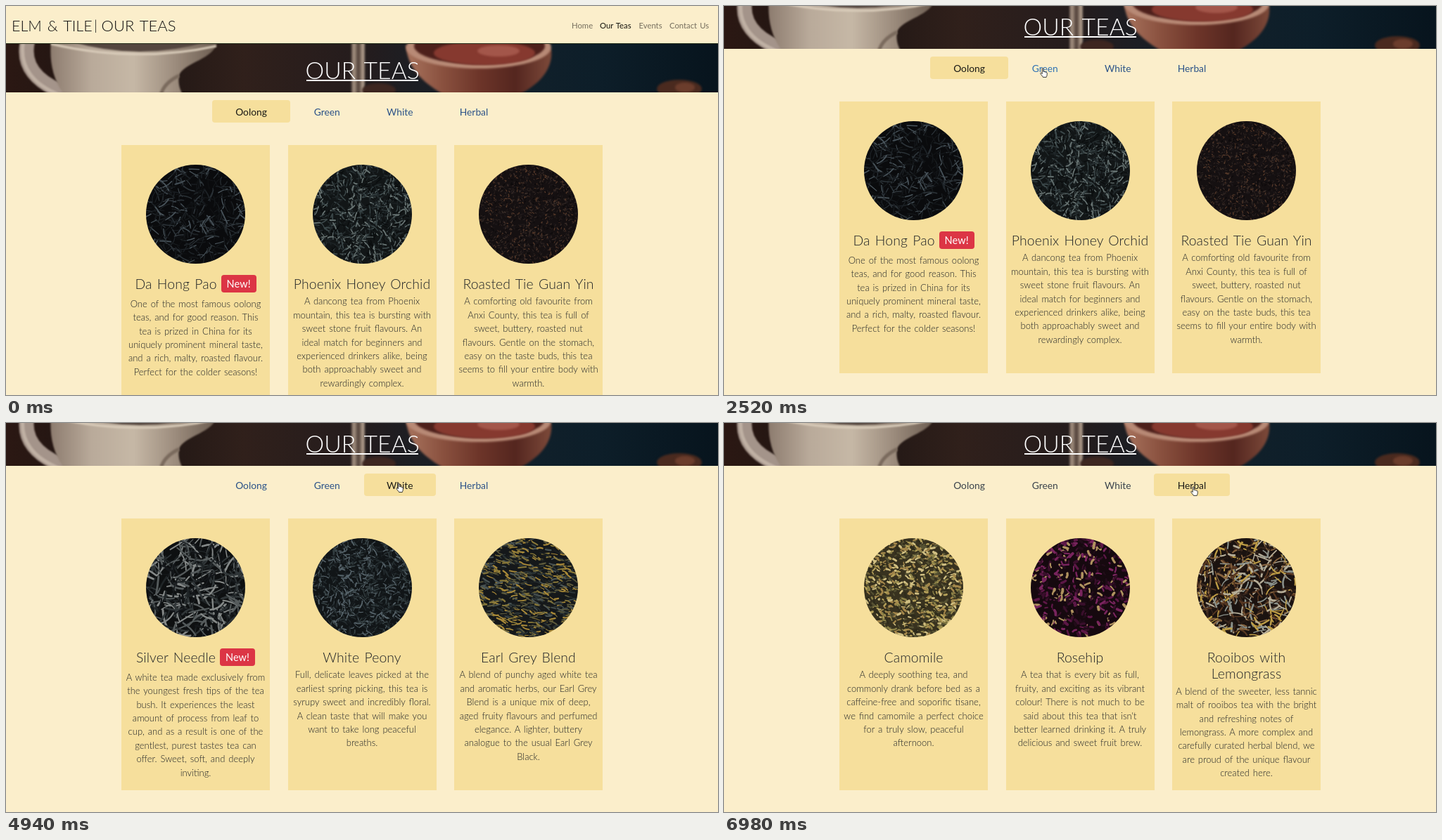
Animation, 1012 px wide and 554 px high, one loop 7.67 s. Source, as an HTML page with a canvas:

```html
<!DOCTYPE html>
<html lang="en">
<head>
<meta charset="utf-8">
<title>Our Teas</title>
<style>
html, body { margin: 0; width: 100%; height: 100%; overflow: hidden; background: #fbeecb; }
body { position: relative; font-family: Lato, "Open Sans", sans-serif; font-weight: 300; color: #212427; }
#page { position: absolute; left: 0; top: 0; width: 1012px; height: 640px; }
#page > *, .pane > *, .txt { position: absolute; white-space: nowrap; }
.txt { line-height: 30px; word-spacing: .1em; }
#rule { left: 0; top: 53px; width: 1012px; height: 1px; background: #26301c; }
#hero { left: 0; top: 54px; }
#line { left: 427px; top: 104.5px; width: 159px; height: 2.5px; background: #fff; }
.tab { top: 134px; height: 32px; line-height: 33px; text-align: center; font-size: 13.8px; border-radius: 4px; font-weight: 400; }
.pane { left: 0; top: 198px; width: 1012px; height: 387px; }
.card { top: 0; width: 211px; height: 386.5px; background: #f6df9c; text-align: center; }
.card canvas { position: absolute; left: 35px; top: 28px; width: 141px; height: 141px; border-radius: 50%; }
h3 { margin: 185.5px 0 4.3px; font: inherit; font-size: 19.4px; line-height: 23.5px; letter-spacing: .1px; word-spacing: .1em; }
h3.new { display: flex; justify-content: center; gap: 6px; height: 23.5px; padding-bottom: 3.4px; }
.badge { width: 50px; height: 25px; margin-top: -.5px; border-radius: 4px; background: #dc3545; color: #fff; font-size: 14.5px; line-height: 26px; font-weight: 400; }
p { margin: 0; font-size: 13px; line-height: 19.4px; word-spacing: 1.4px; font-weight: 300; }
#bar { position: absolute; left: 1006px; top: 0; width: 5px; height: 394px; border-radius: 3px; background: #000; }
#hand { position: absolute; left: 0; top: 0; overflow: visible; }
</style>
</head>
<body>
<div id="page">
  <div id="rule"></div>
  <canvas id="hero" width="1012" height="69"></canvas>
  <div id="line"></div>
</div>
<div id="bar"></div>
<svg id="hand" width="12" height="15"><path fill="#fff" stroke="#222" stroke-width=".9" stroke-linejoin="round"
  d="M3.2 1.6C3.2.3 5 .3 5 1.6V5.6C5.3 4.9 6.7 5 6.8 6 7.2 5.4 8.4 5.6 8.5 6.6 9 6.1 10.2 6.4 10.2 7.6V9.6C10.2 11.6 9.3 12.2 9.2 13.4H4.4C4.2 12 1.2 9.9.8 8.3.6 7.2 1.9 7 2.5 7.8L3.2 8.6Z"/></svg>
<script>
const LOOP = 7670;
const $ = id => document.getElementById(id);
const page = $('page');

function add(parent, tag, cls, text, style) {
  const el = document.createElement(tag);
  el.className = cls;
  el.textContent = text;
  Object.assign(el.style, style);
  return parent.appendChild(el);
}

const label = (text, x, mid, size, color, weight = 300) => add(page, 'div', 'txt', text,
  { left: x + 'px', top: mid - 15 + 'px', fontSize: size + 'px', color, fontWeight: weight });

label('ELM & TILE', 8, 27.5, 21.5, '#111');
label('|', 125, 27, 20, '#111');
label('OUR TEAS', 135.5, 27.5, 22, '#111');
label('Home', 804, 27.5, 11.3, '#77705f', 400);
label('Our Teas', 844, 27.5, 11.3, '#17160f', 400);
label('Events', 899.5, 27.5, 11.3, '#77705f', 400);
label('Contact Us', 943, 27.5, 11.3, '#77705f', 400);
label('OUR TEAS', 425.5, 91, 33.7, '#fff');

// Soft shapes for the banner picture
function paintHero() {
  const c = $('hero').getContext('2d');
  const ramp = (x0, x1, ...cols) => {
    const g = c.createLinearGradient(x0, 0, x1, 0);
    cols.forEach((col, i) => g.addColorStop(i / (cols.length - 1), col));
    return g;
  };
  const shape = (d, fill) => { c.fillStyle = fill; c.fill(new Path2D(d)); };
  const curve = (d, color, w) => { c.strokeStyle = color; c.lineWidth = w; c.stroke(new Path2D(d)); };
  const oval = (x, y, rx, ry, fill) => {
    c.fillStyle = fill;
    c.beginPath();
    c.ellipse(x, y, rx, ry, 0, 0, 7);
    c.fill();
  };
  c.fillStyle = ramp(0, 1012, '#2b1813', '#1c1412', '#30201b', '#241c1d', '#13212b', '#0d1e29', '#07141d');
  c.fillRect(0, 0, 1012, 69);
  c.filter = 'blur(1.2px)';
  curve('M31 -5C22 30 42 56 90 72', '#a4948a', 21);
  curve('M25 -5C18 30 36 58 80 74', '#c0b1a4', 5);
  shape('M64 -4H300C298 22 252 26 246 45 244 58 248 66 252 74H84C64 48 62 20 64 -4Z',
    ramp(62, 300, '#8c7b6e', '#b9aa9a', '#c6b8a6', '#9c8c7d', '#6b5c50'));
  shape('M90 -4H290Q190 26 90 -4Z', '#54463f');
  curve('M64 0Q185 28 299 3', '#d8cbb9', 3);
  curve('M246 45C232 52 222 62 220 74', '#7a6a5d', 5);
  c.filter = 'blur(1.5px)';
  c.fillStyle = ramp(488, 514, '#3a2c28', '#a99685', '#4b3b34', '#b8a493', '#2b2423');
  c.fillRect(491, -4, 19, 78);
  oval(530, 66, 24, 10, '#3d2620');
  shape('M568 2C572 40 598 58 625 74H725C760 58 778 34 775 8Z',
    ramp(568, 776, '#a8745e', '#8a513f', '#6d3529', '#54261f', '#7d4a3a'));
  oval(672, 5, 103, 30, '#b88a76');
  oval(673, 3, 93, 26, '#4d201b');
  oval(680, 13, 72, 17, '#86392f');
  oval(700, 10, 30, 8, '#a3564a');
  oval(957, 64, 32, 13, '#4a2a1f');
  oval(965, 62, 14, 7, '#6b3d2c');
}
paintHero();

function seeded(s) {
  return () => {
    s = (s * 1664525 + 1013904223) % 4294967296;
    return s / 4294967296;
  };
}

// Leaves: base, colours, count, length, width, spread of direction (1 = any)
const looks = {
  daHong: ['#0a0b0d', '#14171a #1c2125 #2b3237 #48535a #0f1113', 520, 15, 1.6, 1],
  phoenix: ['#121617', '#242c2e #3b4749 #687473 #0b0e0f #1b2123', 1000, 9, 1.7, 1],
  tieGuan: ['#151011', '#2a211f #3b2e29 #1f191b #573a2a #0d0a0b', 1700, 2.5, 1.3, 1],
  genmai: ['#12130f', '#20241c #2b3028 #a06b33 #b68144 #7c4c20 #15170f', 560, 4.5, 4.2, 1],
  biluo: ['#12160e', '#84936a #a9b48f #57663f #36422a #1b2214', 330, 20, 3.1, .55],
  silver: ['#0e1011', '#858988 #555b5c #303638 #1f2426 #14171a', 400, 23, 2.5, 1],
  peony: ['#111517', '#354043 #56636a #232b2e #171c1f', 1150, 8, 1.6, 1],
  earl: ['#15181a', '#2c3536 #4b5555 #887839 #a98938 #1b2022 #5d5a3c', 800, 9, 2, .35],
  camomile: ['#38321f', '#b39f58 #8b8147 #d0bf82 #565233 #a3864a #2e2b1b', 1100, 4.5, 2.8, .7],
  rosehip: ['#16090f', '#5c1746 #78245d #390f2b #af925f #210c19 #16090f', 560, 6, 3.6, 1],
  rooibos: ['#1b1310', '#583822 #38261d #86633f #b5ad98 #8a918b #251a15 #bd9c45', 560, 14, 2.4, 1]
};

function paintTea(ctx, name, seed) {
  const [base, cols, count, len, width, spread] = looks[name];
  const colors = cols.split(' '), rnd = seeded(seed * 7919 + 11);
  ctx.fillStyle = base;
  ctx.fillRect(0, 0, 141, 141);
  ctx.lineCap = 'round';
  for (let i = 0; i < count; i++) {
    const x = rnd() * 141, y = rnd() * 141, a = (rnd() - .5) * Math.PI * spread + .2;
    const l = len * (.5 + rnd() * .8) / 2, bend = (rnd() - .5) * l;
    const dx = Math.cos(a) * l, dy = Math.sin(a) * l;
    ctx.strokeStyle = colors[Math.floor(rnd() * colors.length)];
    ctx.lineWidth = width * (.5 + rnd() * .7);
    ctx.beginPath();
    ctx.moveTo(x - dx, y - dy);
    ctx.quadraticCurveTo(x - dy / l * bend, y + dx / l * bend, x + dx, y + dy);
    ctx.stroke();
  }
  if (name !== 'genmai') return;
  ctx.fillStyle = '#ddd6da';
  for (const [px, py] of [[28, 47], [65, 103], [128, 58], [44, 40]])
    for (let i = 0; i < 5; i++) {
      ctx.beginPath();
      ctx.arc(px + rnd() * 9 - 4, py + rnd() * 8 - 4, 1.5 + rnd() * 1.7, 0, 7);
      ctx.fill();
    }
}

function paintSoldOut(ctx) {
  ctx.fillStyle = '#fff';
  ctx.fillRect(0, 0, 141, 141);
  ctx.strokeStyle = '#777';
  ctx.lineWidth = 13;
  ctx.beginPath();
  ctx.moveTo(21.5, 21.5); ctx.lineTo(119.5, 119.5);
  ctx.moveTo(119.5, 21.5); ctx.lineTo(21.5, 119.5);
  ctx.stroke();
}

const teas = [
  [['daHong', 'Da Hong Pao', 'One of the most famous oolong|teas, and for good reason. This|tea is prized in China for its|uniquely prominent mineral taste,|and a rich, malty, roasted flavour.|Perfect for the colder seasons!', 1],
   ['phoenix', 'Phoenix Honey Orchid', 'A dancong tea from Phoenix|mountain, this tea is bursting with|sweet stone fruit flavours. An|ideal match for beginners and|experienced drinkers alike, being|both approachably sweet and|rewardingly complex.'],
   ['tieGuan', 'Roasted Tie Guan Yin', 'A comforting old favourite from|Anxi County, this tea is full of|sweet, buttery, roasted nut|flavours. Gentle on the stomach,|easy on the taste buds, this tea|seems to fill your entire body with|warmth.']],
  [['genmai', 'Genmaicha', 'A Japanese tea famous for its use|of puffed rice to give the tea a|rich, sweet, nutty quality. Matched|perfectly with the steamed|Japanese green tea leaves, a|wonderful dessert tea.'],
   ['biluo', 'Biluochun Traditional', 'A full, strong green tea, with a|powerful hit of fresh spring grass|and a refreshing bitterness. This|tea is not for everyone, but for|those who want a cooling, deep|green tea, this could become a|personal favourite.'],
   ['', 'Dragonwell', 'The most celebrated and vaunted|Chinese green tea, Dragonwell or|Longjing is the peak of what most|people value in green tea;|delicate, full of light spring green|flavours and floral notes, skillfully|wok-roasted and calming head to|toe. Irreplacable!']],
  [['silver', 'Silver Needle', 'A white tea made exclusively from|the youngest fresh tips of the tea|bush. It experiences the least|amount of process from leaf to|cup, and as a result is one of the|gentlest, purest tastes tea can|offer. Sweet, soft, and deeply|inviting.', 1],
   ['peony', 'White Peony', 'Full, delicate leaves picked at the|earliest spring picking, this tea is|syrupy sweet and incredibly floral.|A clean taste that will make you|want to take long peaceful|breaths.'],
   ['earl', 'Earl Grey Blend', 'A blend of punchy aged white tea|and aromatic herbs, our Earl Grey|Blend is a unique mix of deep,|aged fruity flavours and perfumed|elegance. A lighter, buttery|analogue to the usual Earl Grey|Black.']],
  [['camomile', 'Camomile', 'A deeply soothing tea, and|commonly drank before bed as a|caffeine-free and soporific tisane,|we find camomile a perfect choice|for a truly slow, peaceful|afternoon.'],
   ['rosehip', 'Rosehip', "A tea that is every bit as full,|fruity, and exciting as its vibrant|colour! There is not much to be|said about this tea that isn't|better learned drinking it. A truly|delicious and sweet fruit brew."],
   ['rooibos', 'Rooibos with|Lemongrass', 'A blend of the sweeter, less tannic|malt of rooibos tea with the bright|and refreshing notes of|lemongrass. A more complex and|carefully curated herbal blend, we|are proud of the unique flavour|created here.']]
];

const lines = (el, text) => text.split('|').forEach((s, i) => {
  if (i) el.append(document.createElement('br'));
  el.append(s);
});

const panes = teas.map((row, n) => {
  const pane = add(page, 'div', 'pane', '');
  row.forEach(([look, name, text, isNew], i) => {
    const card = add(pane, 'div', 'card', '', { left: 164 + i * 236.5 + 'px' });
    const pic = add(card, 'canvas', '', '');
    pic.width = pic.height = 141;
    const ctx = pic.getContext('2d');
    if (look) paintTea(ctx, look, n * 3 + i + 1);
    else {
      paintSoldOut(ctx);
      add(card, 'div', 'txt', 'OUT OF STOCK', { left: 0, width: '211px', top: '84.5px', fontSize: '16px', fontWeight: 700, color: '#000', wordSpacing: 0 });
    }
    const title = add(card, 'h3', isNew ? 'new' : '', '');
    lines(title, name);
    if (isNew) add(title, 'span', 'badge', 'New!');
    lines(add(card, 'p', '', ''), text);
  });
  return pane;
});

const edges = [293, 404, 508.5, 611, 719];
const tabs = ['Oolong', 'Green', 'White', 'Herbal'].map((s, i) =>
  add(page, 'div', 'tab', s, { left: edges[i] + 'px', width: edges[i + 1] - edges[i] + 'px' }));

// Moments at which the picture moves on
const ticks = [0];
for (const [from, to, n] of [[780, 970, 3], [1070, 1260, 3], [1340, 1440, 2], [1940, 2150, 3], [2330, 2520, 3],
  [2820, 3080, 4], [3290, 3960, 8], [4650, 4760, 2], [4940, 5620, 8], [5720, 5820, 2], [6120, 6290, 3]])
  for (let i = 0; i < n; i++) ticks.push(Math.round(from + (to - from) * i / (n - 1)));

// Linear track through [time, value] points
function track(points, t) {
  let [t0, v0] = points[0];
  for (const [t1, v1] of points) {
    if (t < t1) return t <= t0 ? v0 : v0 + (v1 - v0) * (t - t0) / (t1 - t0);
    t0 = t1; v0 = v1;
  }
  return v0;
}
const scrollPath = [[700, 0], [780, 3], [875, 11], [970, 22], [1165, 45], [1260, 53], [1340, 58], [1440, 62]];
const barFade = [[1840, .5], [2150, 0]];
const glide = (a, b, from, to, t) => {
  const k = Math.min(1, Math.max(0, (t - from) / (to - from)));
  return a + (b - a) * k * k * (3 - 2 * k);
};

// Tab switches: [time, pane shown, opacity]
const fades = [[0, 0, 1], [2820, 0, .45], [2900, 1, .08], [2990, 1, .6], [3080, 1, 1],
  [4650, 2, .35], [4760, 2, 1], [6120, 2, .4], [6200, 3, .45], [6290, 3, 1]];

function draw(now) {
  const t = ticks.filter(k => k <= now).pop();
  const y = track(scrollPath, t);
  page.style.transform = `translateY(${-y}px)`;
  $('bar').style.transform = `translateY(${1.4 + y * .71}px)`;
  $('bar').style.opacity = t < 780 ? 0 : track(barFade, t);

  const x = glide(447, 449, 2330, 2520, t) + glide(0, 101, 3200, 3960, t)
    + glide(0, 109, 4850, 5620, t) + glide(0, 4, 5620, 5820, t);
  const cy = glide(86, 88, 2330, 2520, t) + glide(0, -3, 3200, 3960, t) + glide(0, 5, 4850, 5820, t);
  const shown = t >= 2330;
  $('hand').style.visibility = shown ? 'visible' : 'hidden';
  $('hand').style.transform = `translate(${x}px,${cy}px)`;

  const [, pane, alpha] = fades.filter(f => f[0] <= t).pop();
  panes.forEach((p, i) => { p.style.opacity = i === pane ? alpha : 0; });

  const active = t < 2820 ? 0 : t < 4650 ? 1 : t < 6120 ? 2 : 3;
  tabs.forEach((tab, i) => {
    const hover = shown && x + 4 > edges[i] + 30 && x + 4 < edges[i + 1] - 30;
    tab.style.background = i === active ? '#f6df9c' : 'none';
    tab.style.color = i === active ? '#1b1a16' : hover ? '#2f72b4' : active === 3 ? '#3b434c' : '#2b5288';
  });
}

let start;
function frame(now) {
  start ??= now;
  draw((now - start) % LOOP);
  requestAnimationFrame(frame);
}
draw(0);
requestAnimationFrame(frame);
</script>
</body>
</html>
```
